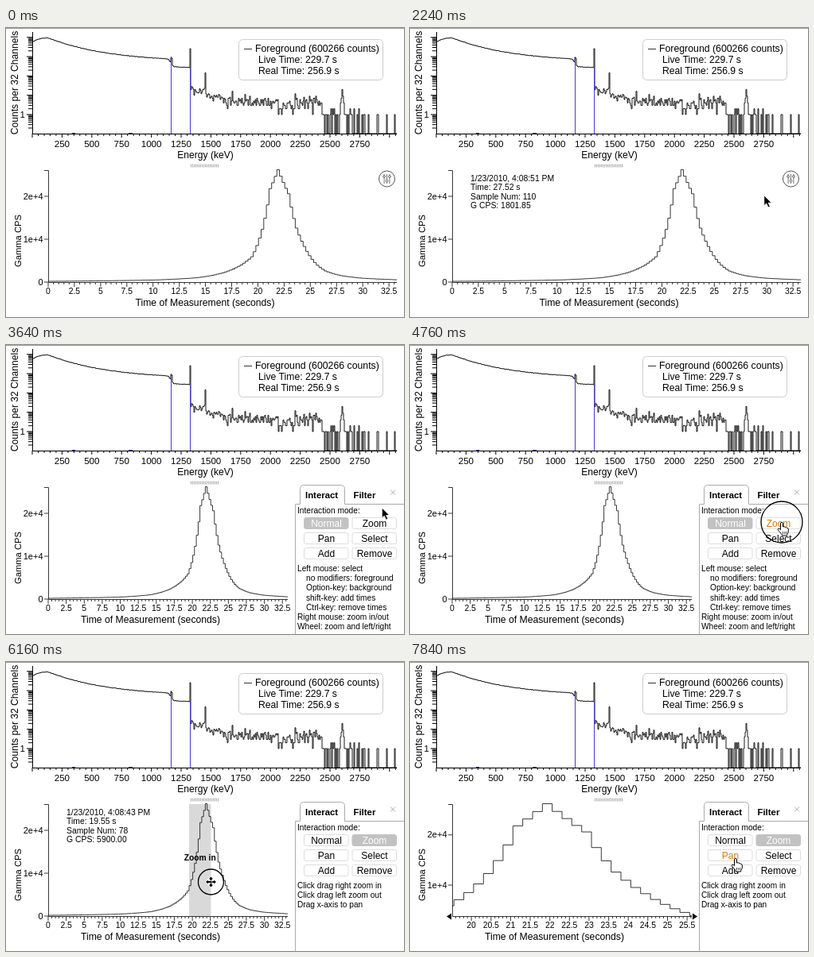
An HTML page that plays this animation: 500x364 px, repeating every 8 s.

```html
<!DOCTYPE html>
<html lang="en">
<head>
<meta charset="utf-8">
<title>Spectrum and time chart</title>
<style>
  html, body { margin: 0; width: 100%; height: 100%; overflow: hidden; background: #fff; }
  svg { display: block; width: 500px; height: 364px; font-family: "Liberation Sans", Arial, sans-serif; }
</style>
</head>
<body>
<svg id="stage" viewBox="0 0 500 364"></svg>
<script>
const STEP = 280, LOOP = 8000;
const stage = document.getElementById('stage');

// ---------- helpers ----------
const mid = 'text-anchor="middle"';
const text = (x, y, str, size, attrs = '') =>
  `<text x="${x}" y="${y}" font-size="${size}" ${attrs}>${str}</text>`;
const path = (d, color = '#000', width = 1) =>
  `<path d="${d}" fill="none" stroke="${color}" stroke-width="${width}"/>`;
const rect = (x, y, w, h, attrs) => `<rect x="${x}" y="${y}" width="${w}" height="${h}" ${attrs}/>`;
const upright = (x, y, str, size) =>
  text(0, 0, str, size, `${mid} transform="translate(${x} ${y}) rotate(-90)"`);
const bell = (x, center, width) => Math.exp(-(((x - center) / width) ** 2));

// Linear interpolation of one column of key points, keyed by column 0
function lerp(keys, x, col = 1) {
  let i = 1;
  while (i < keys.length - 1 && keys[i][0] < x) i++;
  const a = keys[i - 1], b = keys[i];
  const p = Math.min(1, Math.max(0, (x - a[0]) / (b[0] - a[0])));
  return a[col] + (b[col] - a[col]) * p;
}

function seeded(seed) {
  return () => (seed = (seed * 16807) % 2147483647) / 2147483647;
}

function poisson(mean, rnd) {
  const limit = Math.exp(-mean);
  let n = 0;
  for (let p = rnd(); p > limit; p *= rnd()) n++;
  return n;
}

// ---------- energy spectrum ----------
const DECADE = 24.3, ONE = 109, FLOOR = 133, EDGE = 232;
const countY = n => n ? ONE - DECADE * Math.log10(n) : FLOOR;

// Screen height of the dense part: low-energy rise, slow decay, step and peak near x = 207
function continuumY(x) {
  const rise = 6 * Math.exp(-(x - 33) / 7);
  const decay = 31 * (1 - Math.exp(-Math.max(0, x - 52) / 75));
  const step = 9.5 / (1 + Math.exp(206 - x));
  return 12 + rise + decay + step - 12 * bell(x, 207.5, 1);
}

// Expected counts of the sparse part
function sparseMean(x) {
  const base = x < 397 ? 4 + 16 * Math.exp(-(x - EDGE) / 22) : .9 * Math.exp(-(x - 397) / 60);
  return base + 140 * bell(x, 250, .6) + 16 * bell(x, 422, 1.5);
}

function spectrumPath() {
  const rnd = seeded(4217);
  let d = `M33.5 ${FLOOR}`;
  for (let x = 34; x < 491; x++) {
    const y = x < EDGE - 1 ? continuumY(x) + (rnd() - .5) * .6
      : x < EDGE ? 26 : countY(poisson(sparseMean(x), rnd));
    d += `V${y.toFixed(1)}H${x + 1}`;
  }
  return d + `V${FLOOR}`;
}

function topChart() {
  const ex = e => 33 + e * .1496;
  let ticks = 'M33.5 5V133.5H491', labels = '';
  for (let e = 0; e <= 3050; e += 50) {
    const big = e % 250 === 0;
    ticks += `M${ex(e).toFixed(1)} 133v${big ? 5 : 3}`;
    if (big && e && e < 3000) labels += text(ex(e), 150, e, 11.6, mid);
  }
  for (let p = -1; p < 5; p++)
    for (let m = 1; m < 10; m++) {
      const y = countY(m * 10 ** p);
      if (y > 5 && y <= FLOOR) ticks += `M33 ${y.toFixed(1)}h${m === 1 ? -7 : -5}`;
    }
  return path('M0 .5H500', '#999')
    + path(spectrumPath(), '#000', .9)
    + path('M207.5 36V133M231.5 50V133', '#4438e0')
    + path('M83 132.5h4M154 132.5h5', '#2430c8')
    + path(ticks) + labels
    + text(17.5, 113, '1', 11.6)
    + text(250.5, 163.5, 'Energy (keV)', 12.1, mid)
    + upright(15, 69, 'Counts per 32 Channels', 12.1)
    + rect(292.5, 14.5, 181, 51, 'rx="5" fill="#fff" stroke="#ccc"')
    + path('M299 26.5h10', '#333')
    + text(313, 30, 'Foreground (600266 counts)', 12.3)
    + text(317, 44, 'Live Time: 229.7 s', 12.2)
    + text(317, 58, 'Real Time: 256.9 s', 12.2);
}

// ---------- count rate over time ----------
const PERIOD = .2505, BASE = 320, TOP = 178.5, PEAK = 26213;

// [sample, counts per second], interpolated on a log scale
const rates = [[0, 180], [41, 480], [57, 1000], [67, 2150], [74, 4000], [78, 5900], [82, 12300], [85, 21800],
  [88, PEAK], [90, 23248.8], [92, 20600], [95, 12600], [98, 8300], [103, 3932.93], [106, 2600],
  [112, 1500], [120, 900], [134, 520]].map(([n, v]) => [n, Math.log(v)]);

const startOf = n => 21.81 + (n - 88) * PERIOD;
const sampleAt = t => 88 + Math.floor((t - 21.81) / PERIOD);
const rateOf = n => Math.exp(lerp(rates, n));

const wide = { right: 491, t0: 0, t1: 33.25, low: 0 };
const narrow = { ...wide, right: 354 };
const zoomed = { right: 354, t0: 19.51, t1: 25.62, low: 3840 };

const timeAt = (view, x) => view.t0 + (x - 53) * (view.t1 - view.t0) / (view.right - 53);

function timeChart(view) {
  const { right, t0, t1, low } = view;
  const tx = t => 53 + (t - t0) * (right - 53) / (t1 - t0);
  const vy = v => BASE - (v - low) * (BASE - TOP) / (PEAK - low);
  const close = t1 - t0 < 10, minor = close ? .1 : .5;
  let labels = '', ticks = `M48 ${TOP + 1}H53.5V320.5H${right}`, line = '';

  for (let i = Math.ceil(t0 / minor); i * minor <= t1; i++) {
    const x = tx(i * minor), big = i % 5 === 0;
    ticks += `M${x.toFixed(1)} 320v${big ? 6 : 3}`;
    if (big) labels += text(x, 335, +(i * minor).toFixed(1), 10.4, mid);
  }
  for (const [v, name] of [[0, '0'], [1e4, '1e+4'], [2e4, '2e+4']])
    if (v >= low) {
      ticks += `M48 ${vy(v).toFixed(1)}h5`;
      labels += text(46.5, vy(v) + 3.7, name, 11, 'text-anchor="end"');
    }
  for (let n = sampleAt(t0); startOf(n) < t1; n++) {
    const x = Math.max(53, tx(startOf(n))), y = Math.min(BASE, vy(rateOf(n)));
    line += `${line ? 'H' : 'M'}${x.toFixed(1)}${line ? 'V' : ' '}${y.toFixed(1)}`;
  }
  if (close) labels += `<path d="M52 316.5v8l-6-4zM355 316.5v8l6-4z"/>`;
  return path(`${line}H${right}`, '#222', .9) + path(ticks, '#222', .9) + labels
    + text((right + 53) / 2 - 22, 350, 'Time of Measurement (seconds)', 12.2, mid)
    + upright(19, 268, 'Gamma CPS', 11.2);
}

function readout(t) {
  const n = sampleAt(t), sec = String(Math.floor(23.8 + t)).padStart(2, '0');
  return [`1/23/2010, 4:08:${sec} PM`, `Time: ${t.toFixed(2)} s`, `Sample Num: ${n}`,
    `G CPS: ${rateOf(n).toPrecision(6)}`]
    .map((s, i) => text(76, 192.5 + i * 11.6, s, 10.4)).join('');
}

// ---------- controls ----------
const sliders = '<circle cx="478.5" cy="190" r="10" fill="#fff" stroke="#555"/>'
  + [-1, 0, 1].map(i => {
    const x = 478.5 + i * 3.4;
    return path(`M${x} 184v12`, '#555', .8)
      + `<circle cx="${x}" cy="${i ? 187 : 192.5}" r="1.4" fill="#fff" stroke="#444" stroke-width=".8"/>`;
  }).join('');

const grip = path(Array.from({ length: 18 }, (_, i) => `M${232.5 + i * 2} 171.5v4`).join(''), '#aaa');

const help = {
  Normal: ['Left mouse: select', '>no modifiers: foreground', '>Option-key: background',
    '>shift-key: add times', '>Ctrl-key: remove times', 'Right mouse: zoom in/out', 'Wheel: zoom and left/right'],
  Zoom: ['Click drag right zoom in', 'Click drag left zoom out', 'Drag x-axis to pan']
};

function panel(mode, hover) {
  let out = path('M363.5 364V200.5H369.5V181.5q0-5 5-5H420.5q5 0 5 5V200.5H500', '#aaa')
    + text(376, 192.5, 'Interact', 11.4, 'font-weight="bold"')
    + text(436.5, 192.5, 'Filter', 11.4, 'font-weight="bold"')
    + path('M483 182.5l6 6m0-6l-6 6', '#aaa')
    + text(366, 212, 'Interaction mode:', 10.2);
  ['Normal', 'Zoom', 'Pan', 'Select', 'Add', 'Remove'].forEach((name, i) => {
    const x = 374.5 + (i % 2) * 60.5, y = 217.5 + (i >> 1) * 19;
    const on = name === mode;
    const ink = on ? '#fff' : name === hover ? '#d9780f' : '#000';
    out += rect(x, y, 55.5, 14, `rx="2.5" fill="${on ? '#c2c2c2' : '#fff'}" stroke="${on ? '#c2c2c2' : '#ddd'}"`)
      + text(x + 28, y + 11.3, name, 12, `${mid} fill="${ink}"`);
  });
  help[mode].forEach((s, i) => {
    const inset = s[0] === '>';
    out += text(inset ? 377 : 366, 285 + i * 12.2, inset ? s.slice(1) : s, 10.15);
  });
  return out;
}

// ---------- pointer ----------
const arm = turn => `<path d="M-1 0V-3.7H-2.6L0-6.5L2.6-3.7H1V0Z" transform="rotate(${turn})"
  stroke="#fff" stroke-width="1.6" paint-order="stroke"/>`;
const shapes = {
  arrow: '<path d="M0 0V13L3 10.3L5.2 15.2L7.6 14.2L5.4 9.5H9.6Z" stroke="#fff" stroke-width=".9"/>',
  hand: `<path d="M-1.5 1.2q1.5-2.2 3 0V6q2-1 2.6.4q1.8-.6 2.2 1q2-.2 2 1.6V12q-.2 2-1.6 3.5V17H.2v-1.4
    Q-2.5 12.5-5 9.5q.4-2 2.3-1l1.2 1.2Z" fill="#fff" stroke="#000"/>`
    + path('M1.5 12v3M3.7 12v3M5.7 12v3', '#000', .7),
  move: [0, 90, 180, 270].map(arm).join('') + rect(-1, -1, 2, 2, '')
};

// [step, x, y]
const track = [[2, 130, 300], [4, 340.69, 271], [5, 357, 267], [9, 474, 192], [11, 477.5, 188],
  [15, 467, 222], [17, 467, 223], [19, 255.06, 267], [20, 250.5, 269], [21, 230, 276],
  [23, 284.93, 278], [25, 285.5, 278], [28, 409, 247]];
const presses = [[16, 17], [21, 25]];

// A steady ring while pressed, a wider one on release
function ring(k, x, y) {
  const press = presses.find(([down, up]) => k >= down && k <= up);
  if (!press) return '';
  return `<circle cx="${x}" cy="${y}" r="${k === press[1] ? 26 : 16}" fill="none" stroke="#000" stroke-width="1.3"/>`;
}

function scene(k) {
  const open = k >= 12, zoomMode = k >= 18, closeUp = k >= 25;
  const drag = k >= 21 && k < 25;
  const view = closeUp ? zoomed : open ? narrow : wide;
  const x = lerp(track, k), y = lerp(track, k, 2);
  const onIcon = k >= 9 && k < 12;
  const hover = k >= 15 && k < 18 ? 'Zoom' : k === 28 ? 'Pan' : '';
  const overChart = x < view.right && k > 2 && !onIcon;
  let out = '';

  if (drag) out += rect(230, 179, x - 230, 141, 'fill="#d9d9d9"');
  out += grip + timeChart(view);
  if (drag && x > 240) out += text((230 + x) / 2, 250, 'Zoom in', 10.3, `${mid} font-weight="bold"`);
  // The readout trails the pointer by one step
  if (overChart) out += readout(timeAt(view, Math.min(view.right, lerp(track, k - 1))));
  out += open ? panel(zoomMode ? 'Zoom' : 'Normal', hover) : sliders;

  if (k >= 2) {
    const kind = onIcon || hover ? 'hand' : drag ? 'move' : 'arrow';
    out += ring(k, x, y) + `<g transform="translate(${x} ${y})">${shapes[kind]}</g>`;
  }
  return out;
}

// ---------- loop ----------
stage.innerHTML = topChart() + '<g id="live"></g>';
const live = document.getElementById('live');
let shown = -1;

function draw(now) {
  const k = Math.floor((now % LOOP) / STEP);
  if (k !== shown) live.innerHTML = scene(shown = k);
  requestAnimationFrame(draw);
}
draw(performance.now());
</script>
</body>
</html>
```
